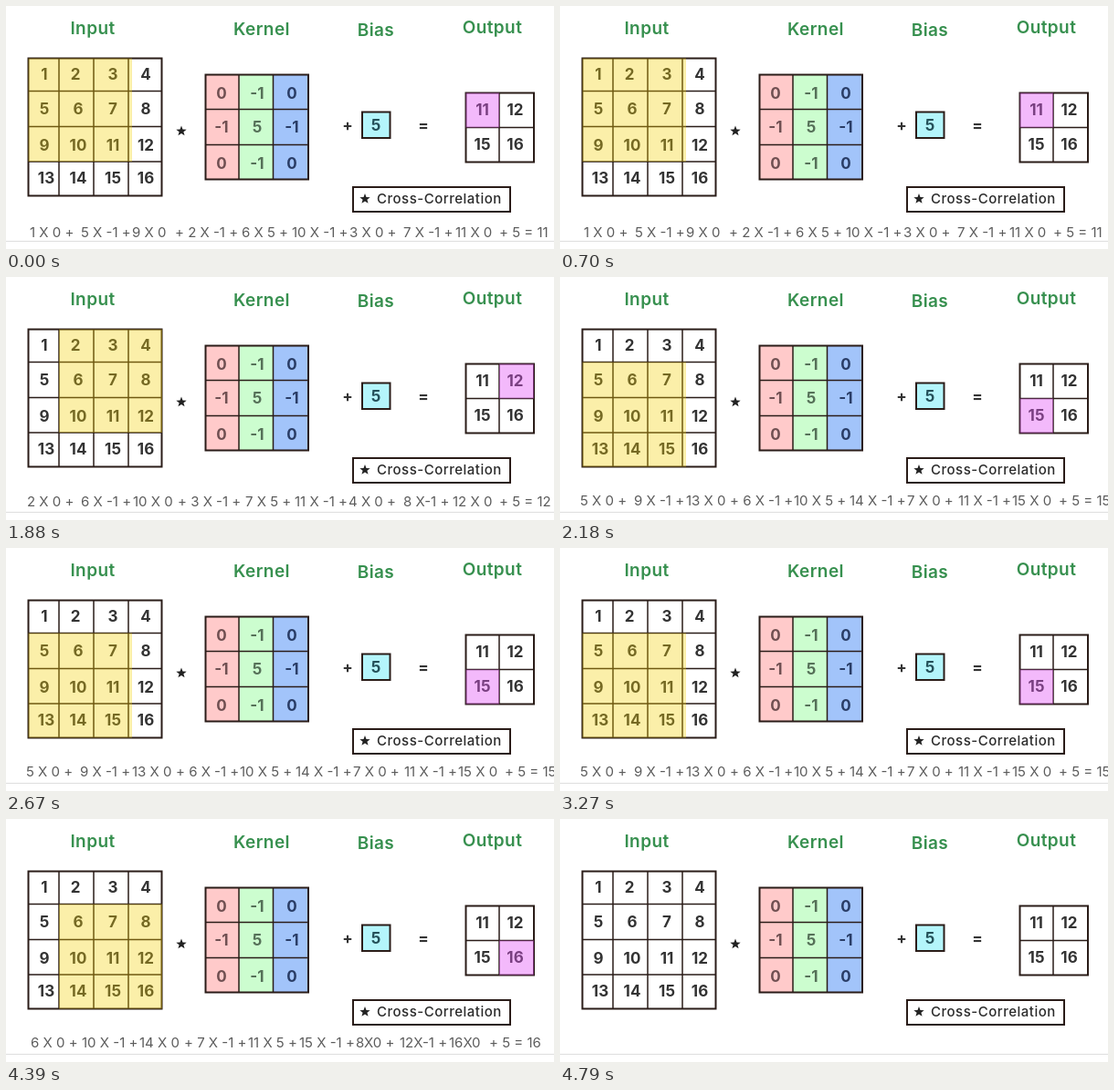
These frames come from a looping animation (600 px wide and 267 px high, 4890 ms). An HTML page:

```html
<!DOCTYPE html>
<html lang="en">
<head>
<meta charset="utf-8">
<title>Cross-correlation</title>
<style>
  html, body { margin: 0; width: 100%; height: 100%; overflow: hidden; background: #fff; }
  svg { display: block; width: 600px; height: 267px; font-family: Inter, "Open Sans", sans-serif; }
  .title { font-size: 19px; font-weight: 600; fill: #37904f; letter-spacing: .4px; text-anchor: middle; }
  .num { font-size: 17px; font-weight: 700; fill: #333; text-anchor: middle; }
  .sum { font-size: 15px; fill: #5c5c5c; }
  .legend { font-size: 15px; font-weight: 500; fill: #2b2b2b; letter-spacing: .5px; }
  .line { fill: none; stroke: #2a1c18; }
</style>
</head>
<body>
<svg id="stage" viewBox="0 0 600 267"></svg>
<script>
const NS = "http://www.w3.org/2000/svg";
const stage = document.getElementById("stage");

function add(tag, attrs, text, parent = stage) {
  const el = document.createElementNS(NS, tag);
  for (const key in attrs) el.setAttribute(key, attrs[key]);
  if (text !== undefined) el.textContent = text;
  parent.appendChild(el);
  return el;
}

const label = (text, x, y, cls, style = "") => add("text", { x, y, class: cls, style }, text);

function box(x1, y1, x2, y2, fill, parent) {
  return add("rect", { x: x1, y: y1, width: x2 - x1, height: y2 - y1, fill }, undefined, parent);
}

// The first and last entries of xs and ys form the heavier outer border.
function grid(xs, ys) {
  const [l, r] = [xs[0], xs.at(-1)], [t, b] = [ys[0], ys.at(-1)];
  const inner = xs.slice(1, -1).map(x => `M${x} ${t}V${b}`)
    .concat(ys.slice(1, -1).map(y => `M${l} ${y}H${r}`)).join("");
  add("path", { d: inner, class: "line", "stroke-width": 1.5 });
  add("path", { d: `M${l} ${t}H${r}V${b}H${l}Z`, class: "line", "stroke-width": 2 });
}

function star(cx, cy, r) {
  const points = Array.from({ length: 10 }, (_, i) => {
    const a = i * Math.PI / 5 - Math.PI / 2, d = i % 2 ? r * 0.42 : r;
    return `${(cx + d * Math.cos(a)).toFixed(2)},${(cy + d * Math.sin(a)).toFixed(2)}`;
  });
  add("polygon", { points: points.join(" "), fill: "#222" });
}

label("Input", 95, 31, "title");
label("Kernel", 280, 32, "title");
label("Bias", 405, 33, "title");
label("Output", 532.5, 30, "title");

// Input
const inX = [24.5, 58, 96, 134, 170.5], inY = [57.5, 93.5, 132.5, 171, 208.5];
const inCols = [42, 79, 117, 153], inRows = [81, 119, 159, 195];
grid(inX, inY);
for (let i = 0; i < 16; i++) {
  const nudge = i === 1 ? -3 : i === 12 ? 2 : 0;
  label(i + 1, inCols[i % 4] + nudge, inRows[i >> 2], "num");
}

// Kernel
const kX = [218.5, 255, 292.5, 331], kY = [75.5, 113.5, 152.5, 190.5];
const kCols = [236, 275, 313], kRows = [102, 139, 179];
const tints = ["#ffcaca", "#ccfdcf", "#a2c4fa"];
const inks = ["#705052", "#557058", "#2a3d66"];
const kernel = [0, -1, 0, -1, 5, -1, 0, -1, 0];
tints.forEach((tint, c) => box(kX[c], kY[0], kX[c + 1], kY[3], tint));
grid(kX, kY);
kernel.forEach((v, i) => label(v, kCols[i % 3], kRows[Math.floor(i / 3)], "num", `fill:${inks[i % 3]}`));

// Bias and operators
star(192, 137.5, 6);
label("+", 374, 137, "num");
box(390, 116.5, 420.5, 145, "#b4f5fb");
grid([390, 420.5], [116.5, 145]);
label("5", 405, 137, "num", "fill:#245059");
label("=", 457, 137, "num");

// Output
const outX = [503.5, 540, 578], outY = [95.5, 133.5, 171.5];
grid(outX, outY);
[11, 12, 15, 16].forEach((v, i) => label(v, i % 2 ? 557.5 : 521.5, i < 2 ? 120 : 158, "num"));

// Legend
grid([380, 552], [199, 226]);
star(393, 212, 6);
label("Cross-Correlation", 406, 217, "legend");
box(0, 258, 600, 259, "#dedede");

// Each step: start time, baseline, terms of the sum and where they begin.
const steps = [
  { at: 0, y: 254,
    sum: "1 X 0 +|5 X -1 +|9 X 0|+ 2 X -1 +|6 X 5 +|10 X -1 +|3 X 0 +|7 X -1 +|11 X 0|+ 5 = 11",
    xs: [26, 82, 138, 185, 258, 313, 376, 435, 492, 540] },
  { at: 1000, y: 252,
    sum: "2 X 0 +|6 X -1 +|10 X 0|+ 3 X -1 +|7 X 5 +|11 X -1 +|4 X 0 +|8 X-1 +|12 X 0|+ 5 = 12",
    xs: [23, 82, 139, 188, 262, 316, 375, 435, 489, 540] },
  { at: 2180, y: 251,
    sum: "5 X 0 +|9 X -1 +|13 X 0|+ 6 X -1 +|10 X 5 +|14 X -1 +|7 X 0 +|11 X -1 +|15 X 0|+ 5 = 15",
    xs: [22, 81, 138, 186, 256, 317, 380, 436, 495, 546] },
  { at: 3510, y: 251,
    sum: "6 X 0 +|10 X -1 +|14 X 0|+ 7 X -1 +|11 X 5 +|15 X -1 +|8X0 +|12X-1 +|16X0|+ 5 = 16",
    xs: [27, 83, 146, 195, 265, 321, 383, 431, 485, 529] }
];
const CLEAR = 4690, LOOP = 4890;

const layers = steps.map(({ y, sum, xs }, i) => {
  const g = add("g", { visibility: "hidden" });
  const c = i % 2, r = i >> 1;
  const right = c ? 171 : 138;
  box(inX[c], inY[r], right, inY[r + 3], "rgba(244,209,5,.34)", g);
  box(outX[c], outY[r], outX[c + 1], outY[r + 1], "rgba(225,80,245,.4)", g);
  sum.split("|").forEach((term, k) => add("text", { x: xs[k], y, class: "sum" }, term, g));
  return g;
});

function draw(now) {
  const t = now % LOOP;
  const active = t < CLEAR ? steps.findLastIndex(s => t >= s.at) : -1;
  layers.forEach((g, i) => g.setAttribute("visibility", i === active ? "visible" : "hidden"));
}

const start = performance.now();
function tick() {
  draw(performance.now() - start);
  requestAnimationFrame(tick);
}
tick();
</script>
</body>
</html>
```
